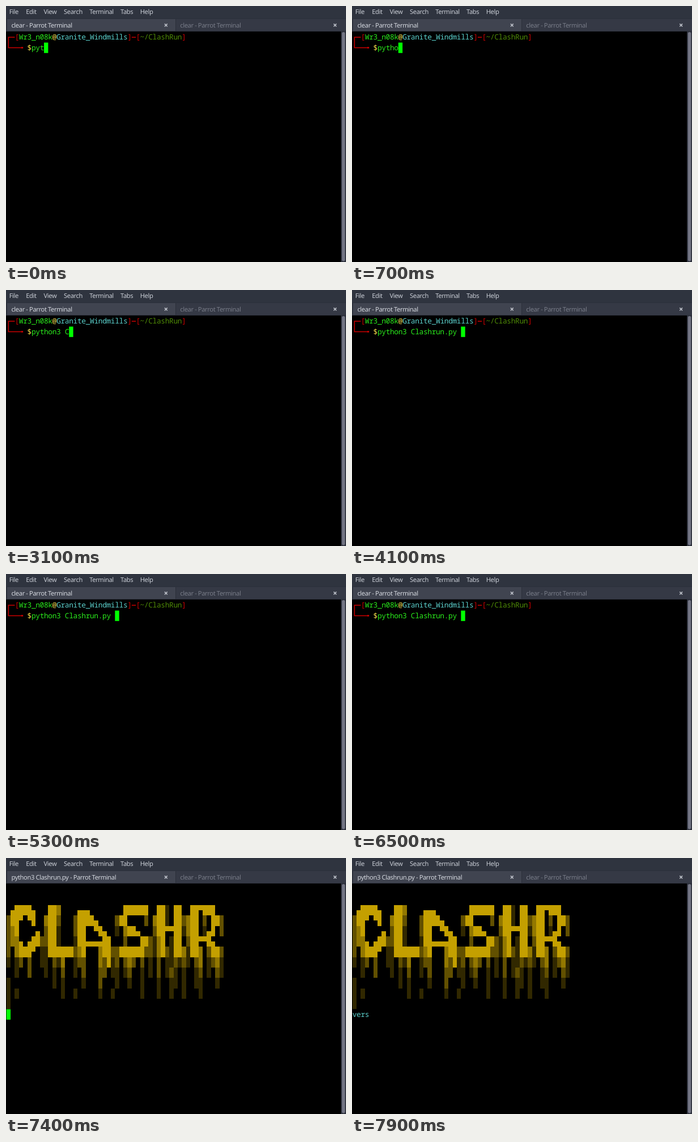
Write an HTML page that moves like this. It is 600x451 px and loops after 8 s.

```html
<!DOCTYPE html>
<html lang="en">
<head>
<meta charset="utf-8">
<title>Terminal</title>
<style>
  html, body { margin: 0; width: 100%; height: 100%; overflow: hidden; background: #000; }
  svg { display: block; width: 600px; height: 451px; text-rendering: geometricPrecision; }
  .ui { font: 11.2px "Noto Sans", sans-serif; letter-spacing: -0.4px; }
  .mono { font: 12.9px "Noto Sans Mono", monospace; letter-spacing: -0.37px; white-space: pre; }
</style>
</head>
<body>
<svg id="stage" viewBox="0 0 600 451"></svg>
<script>
const LOOP = 8000;
const CELL_W = 7.37, CELL_H = 18.36, LEFT = 0.7, TOP = 46.1;
const RED = '#cc0000', GREEN = '#2aea1c', CYAN = '#5bd0cc', YELLOW = '#f5dc4c', PATH = '#4e8a06';

const colX = c => LEFT + c * CELL_W;
const rowY = r => TOP + r * CELL_H;

function add(parent, tag, attrs, text) {
  const el = document.createElementNS('http://www.w3.org/2000/svg', tag);
  for (const key in attrs) el.setAttribute(key, attrs[key]);
  if (text) el.textContent = text;
  return parent.appendChild(el);
}
const rect = (parent, x, y, width, height, fill) =>
  add(parent, 'rect', { x, y, width, height, fill });
const label = (x, y, fill, text) =>
  add(stage, 'text', { x, y, fill, class: 'ui' }, text);
const mono = (parent, col, row, fill, text) =>
  add(parent, 'text', { x: colX(col), y: rowY(row) + 13.3, fill, class: 'mono' }, text);

// Fills part of a cell, snapped to whole pixels so neighbours join.
function block(parent, col, row, from, to, fill) {
  const x = Math.round(colX(col)), y = Math.round(rowY(row + from));
  return rect(parent, x, y, Math.round(colX(col + 1)) - x, Math.round(rowY(row + to)) - y, fill);
}

const stage = document.getElementById('stage');

// Window frame
rect(stage, 0, 0, 600, 451, '#000');
rect(stage, 0, 0, 600, 45, '#2f343f');
rect(stage, 0, 22, 600, 23, '#2b2f3a');
rect(stage, 2, 23, 297, 21, '#404450');
rect(stage, 300, 23, 300, 21, '#353945');
rect(stage, 591, 45, 9, 406, '#2e323d');
add(stage, 'rect', { x: 592.8, y: 46, width: 5.5, height: 403.5, rx: 2.7, fill: '#747685' });

[['File', 5.7], ['Edit', 35.2], ['View', 66.5], ['Search', 102],
 ['Terminal', 147.2], ['Tabs', 202], ['Help', 236.7]]
  .forEach(([name, x]) => label(x, 14.1, '#c8ccd4', name));

const tabTitle = label(9.4, 38, '#d3d7de');
label(307.2, 38, '#777b87', 'clear - Parrot Terminal');
for (const x of [282.3, 580.7]) {
  add(stage, 'path', {
    d: `M${x - 2.4} 31.4l4.8 4.8m0-4.8l-4.8 4.8`,
    stroke: '#c0c4cc', 'stroke-width': 1.5, fill: 'none'
  });
}

// Shell prompt
const prompt = add(stage, 'g', {});
const user = 'Wr3_n08k', host = 'Granite_Windmills', dir = '~/ClashRun';
const midY = r => rowY(r + 0.5) - 0.2;
const line = d => add(prompt, 'path', { d, stroke: RED, 'stroke-width': 1.5, fill: 'none' });
let col = 2;
for (const [text, fill] of [['[', RED], [user, GREEN], ['@', YELLOW], [host, CYAN],
                            [']', RED], ['─', RED], ['[', RED], [dir, PATH], [']', RED]]) {
  if (text === '─') line(`M${colX(col)} ${midY(0)}h${CELL_W}`);
  else mono(prompt, col, 0, fill, text);
  col += text.length;
}
line(`M${colX(2)} ${midY(0)}H${colX(0.5)}V${midY(1)}H${colX(3.5)}`);
rect(prompt, colX(3.5), midY(1) - 1.3, CELL_W / 2, 2.6, RED);
mono(prompt, 5, 1, YELLOW, '$');
const command = mono(prompt, 6, 1, GREEN);

// Banner
const SHADES = { '█': '#c4a000', '▀': '#c4a000', '▄': '#c4a000',
                 '▓': '#937800', '▒': '#625000', '░': '#312800' };
const LINES = [
  ' ▄████▄  ' + ' ██▓    ' + '▄▄▄      ' + '  ██████ ' + ' ██░ ██ ' + ' ██▀███  ',
  '▒██▀ ▀█  ' + '▓██▒   ▒' + '████▄    ' + '▒██    ▒ ' + '▓██░ ██▒' + '▓██ ▒ ██▒',
  '▒▓█    ▄ ' + '▒██░   ▒' + '██  ▀█▄  ' + '░ ▓██▄   ' + '▒██▀▀██░' + '▓██ ░▄█ ▒',
  '▒▓▓▄ ▄██▒' + '▒██░   ░' + '██▄▄▄▄██ ' + '  ▒   ██▒' + '░▓█ ░██ ' + '▒██▀▀█▄  ',
  '▒ ▓███▀ ░' + '░██████▒' + '▓█   ▓██▒' + '▒██████▒▒' + '░▓█▒░██▓' + '░██▓ ▒██▒',
  '░ ░▒ ▒  ░' + '░ ▒░▓  ░' + '▒▒   ▓▒█░' + '▒ ▒▓▒ ▒ ░' + ' ▒ ░░▒░▒' + '░ ▒▓ ░▒▓░',
  '  ░  ▒   ' + '░ ░ ▒  ░' + ' ▒   ▒▒ ░' + '░ ░▒  ░ ░' + ' ▒ ░▒░ ░' + '  ░▒ ░ ▒░',
  '░        ' + '  ░ ░   ' + ' ░   ▒   ' + '░  ░  ░  ' + ' ░  ░░ ░' + '  ░░   ░ ',
  '░ ░      ' + '    ░  ░' + '     ░  ░' + '      ░  ' + ' ░  ░  ░' + '   ░     ',
  '░'
];
const output = add(stage, 'g', {});
LINES.forEach((text, r) => [...text].forEach((ch, c) => {
  if (SHADES[ch]) block(output, c, r + 2, ch === '▄' ? 0.5 : 0, ch === '▀' ? 0.5 : 1, SHADES[ch]);
}));
const message = mono(output, 0, 12, CYAN);

const cursor = rect(stage, 0, 0, CELL_W, CELL_H, '#00ff00');

// Timeline
const TYPED = [[0, 'pyt'], [300, 'pyth'], [700, 'pytho'], [1100, 'python'], [2000, 'python3'],
               [2600, 'python3 '], [3100, 'python3 C'], [3700, 'python3 Cl'],
               [4100, 'python3 Clashrun.py ']];
const RUN = 6900, SHOW = 7400, SPEAK = 7600, BLINK = 600;

function placeCursor(c, r) {
  cursor.setAttribute('x', colX(c));
  cursor.setAttribute('y', rowY(r));
}
const show = (el, on) => el.setAttribute('visibility', on ? 'visible' : 'hidden');

function draw(t) {
  const [typedAt, text] = TYPED.filter(([at]) => at <= t).pop();
  const running = t >= RUN, banner = t >= SHOW;
  const spoken = t < SPEAK ? 0 : Math.floor((t - SPEAK) / 100) + 1;

  tabTitle.textContent = (running ? 'python3 Clashrun.py' : 'clear') + ' - Parrot Terminal';
  command.textContent = text;
  message.textContent = 'vers'.slice(0, spoken);
  show(prompt, !banner);
  show(output, banner);

  if (banner) placeCursor(spoken, 12);
  else if (running) placeCursor(0, 2);
  else placeCursor(6 + text.length, 1);

  // The blink starts over once typing ends and again when the script runs.
  const idle = t - (running ? RUN : typedAt);
  const typing = t < TYPED[TYPED.length - 1][0];
  show(cursor, typing || Math.floor(idle / BLINK) % 2 === 0);
}

const start = performance.now();
function tick() {
  draw((performance.now() - start) % LOOP);
  requestAnimationFrame(tick);
}
tick();
</script>
</body>
</html>
```
